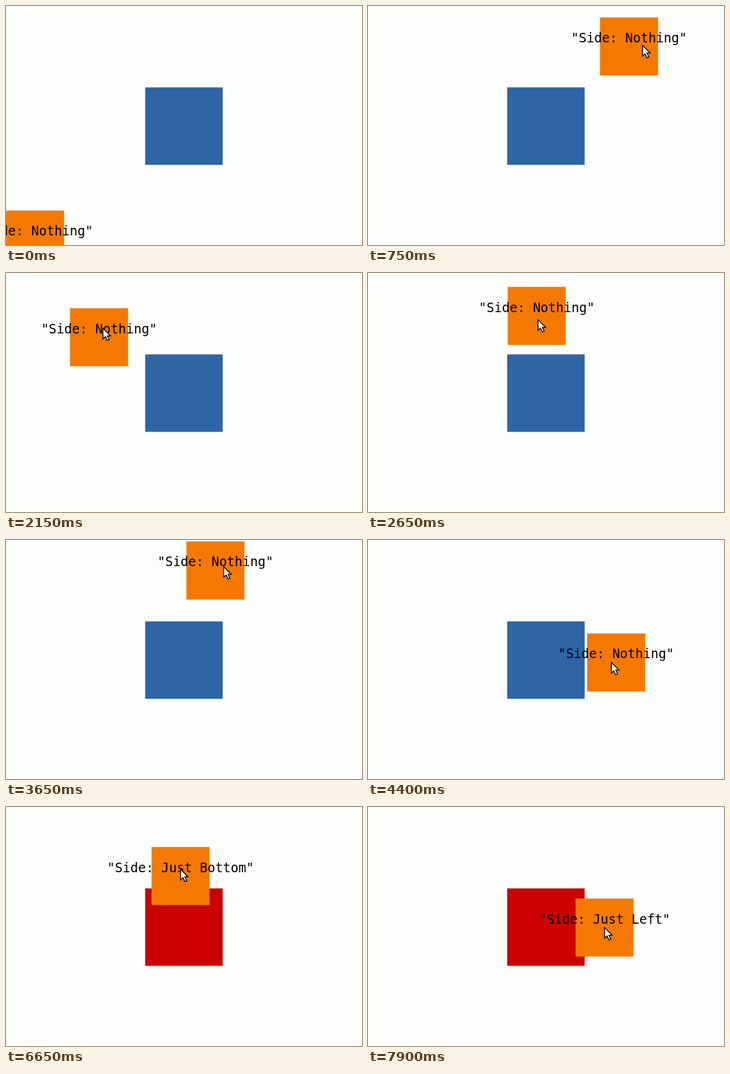
Animation of 518 by 348 pixels, one loop 8 s. Source, as an HTML page with a canvas:

```html
<!DOCTYPE html>
<html lang="en">
<head>
<meta charset="utf-8">
<title>Square collision sides</title>
<style>
  html, body { margin: 0; width: 100%; height: 100%; overflow: hidden; background: #fcfefb; }
  canvas { display: block; }
</style>
</head>
<body>
<canvas id="stage" width="518" height="348"></canvas>
<script>
const ctx = document.getElementById('stage').getContext('2d');
const LOOP = 8000, STEP = 50, LAST = 7900;
const CURSOR_LEAD = 40;
const box = { left: 202.5, top: 118.5, right: 315.3, bottom: 231.3 };
const HALF = 42.25;

// Time in ms, then the centre of the dragged square.
const path = [
  [0, 42.3, 340], [180, 70, 230], [480, 190, 72], [650, 320, 70], [850, 420, 72],
  [1000, 400, 240], [1110, 260, 292], [1250, 88, 225], [1330, 150, 176], [1400, 165.3, 174],
  [1600, 180, 173], [1850, 150, 170], [2000, 122, 140], [2350, 170, 40], [2550, 234, 56],
  [2650, 245.5, 62.5], [3000, 256, 112], [3400, 257, 100], [3700, 320, 38], [3950, 436, 60],
  [4250, 384, 174], [4400, 361, 178.3], [4800, 297, 175], [5100, 360, 180], [5220, 402, 230],
  [5400, 315, 296], [5500, 276.3, 299.5], [5800, 253, 265], [5950, 254, 252], [6400, 254, 215],
  [6650, 254, 100.5], [6720, 254, 88], [6850, 255, 88], [7350, 290, 115], [7650, 338, 152],
  [7900, 344.2, 175.5]
];

function slope(i, axis) {
  const before = path[i - 1], after = path[i + 1];
  return before && after ? (after[axis] - before[axis]) / (after[0] - before[0]) : 0;
}

// Cubic Hermite curve through the path points.
function positionAt(time) {
  const t = Math.min(time, LAST);
  const i = path.findIndex((point, k) => t <= path[k + 1][0]);
  const a = path[i], b = path[i + 1], span = b[0] - a[0], u = (t - a[0]) / span;
  const blend = axis =>
    a[axis] * (1 + 2 * u) * (1 - u) ** 2 + b[axis] * u * u * (3 - 2 * u) +
    span * u * (1 - u) * (slope(i, axis) * (1 - u) - slope(i + 1, axis) * u);
  return { x: blend(1), y: blend(2) };
}

// A side counts only when both of its corners, and no others, are inside the box.
function touchingSide({ x, y }) {
  const inX = v => v > box.left && v < box.right;
  const inY = v => v > box.top && v < box.bottom;
  const left = inX(x - HALF), right = inX(x + HALF);
  const top = inY(y - HALF), bottom = inY(y + HALF);
  if (top && bottom && left !== right) return left ? 'Just Left' : 'Just Right';
  if (left && right && top !== bottom) return top ? 'Just Top' : 'Just Bottom';
  return 'Nothing';
}

const arrow = new Path2D('M0 0V15.5L3.6 12.2L6.3 18L9 16.8L6.4 11.1H11Z');

function drawCursor({ x, y }) {
  ctx.save();
  ctx.translate(x, y);
  ctx.fillStyle = '#fff';
  ctx.strokeStyle = '#000';
  ctx.lineWidth = 1.3;
  ctx.fill(arrow);
  ctx.stroke(arrow);
  ctx.restore();
}

function draw(t) {
  const pos = positionAt(t), side = touchingSide(pos);
  ctx.fillStyle = '#fcfefb';
  ctx.fillRect(0, 0, 518, 348);
  ctx.fillStyle = side === 'Nothing' ? '#2d65a5' : '#cc0000';
  ctx.fillRect(box.left, box.top, box.right - box.left, box.bottom - box.top);
  ctx.fillStyle = '#f57900';
  ctx.fillRect(pos.x - HALF, pos.y - HALF, 2 * HALF, 2 * HALF);
  ctx.fillStyle = '#000';
  ctx.font = '14pt "DejaVu Sans Mono", monospace';
  ctx.textAlign = 'center';
  ctx.fillText(`"Side: ${side}"`, pos.x, pos.y - 6);
  if (t >= 100) drawCursor(positionAt(t + CURSOR_LEAD));
}

function tick() {
  const t = performance.now() % LOOP;
  draw(Math.min(Math.floor(t / STEP) * STEP, LAST));
  requestAnimationFrame(tick);
}
tick();
</script>
</body>
</html>
```
